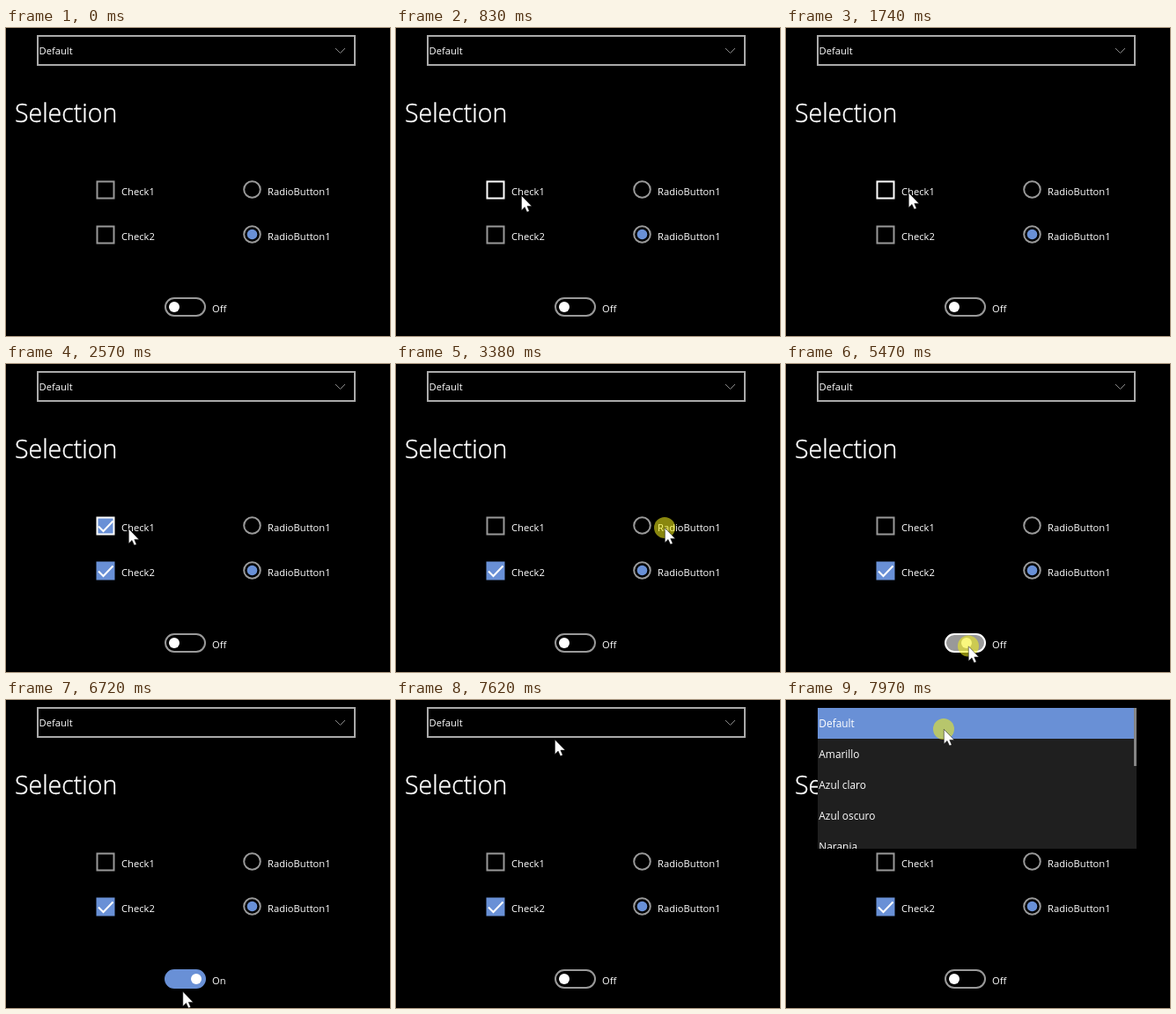
Recreate the animation shown at these times as an HTML page. Size 436x350 px, loop 8 s.

```html
<!DOCTYPE html>
<html lang="en">
<head>
<meta charset="utf-8">
<title>Selection controls</title>
<style>
html, body { margin: 0; width: 100%; height: 100%; overflow: hidden; background: #000; }
svg { display: block; width: 436px; height: 350px; }
text { font: 11.2px "Open Sans", "Noto Sans", sans-serif; fill: #fff; }
.title { font-size: 28.5px; font-weight: 300; stroke: #fff; stroke-width: .4; }
.popup text { font-size: 11.9px; }
.line { fill: none; stroke: #999; stroke-width: 2; }
.accent { fill: #6990d6; }
.tick { fill: none; stroke: #fff; stroke-width: 2; }
.checked > .fill { fill: #6990d6; stroke: #6990d6; }
.pressed > .fill { fill: #999; stroke: #999; }
.hover > .line { stroke: #fff; }
.combo > .line { stroke: #aaa; }
.combo.hover > .line { stroke: #ddd; }
.option:not(.checked) > .mark, .hidden { display: none; }
</style>
</head>
<body>
<svg viewBox="0 0 436 350" xmlns="http://www.w3.org/2000/svg">
  <clipPath id="list"><rect x="36" y="9" width="362" height="160"/></clipPath>
  <g id="combo" class="combo">
    <rect class="line" x="36" y="9" width="360" height="33"/>
    <text x="37.5" y="30">Default</text>
    <path d="M374 23l5.5 5.5 5.5-5.5" fill="none" stroke="#8a8a8a"/>
  </g>
  <text class="title" x="10" y="107">Selection</text>
  <g id="options"></g>
  <g id="toggle">
    <rect class="line fill" x="181" y="307" width="45" height="20" rx="10"/>
    <circle id="knob" cy="317" r="6" fill="#fff"/>
    <text id="state" x="234" y="323">Off</text>
  </g>
  <g id="popup" class="popup" clip-path="url(#list)">
    <rect x="36" y="9" width="362" height="160" fill="#1f1f1f"/>
    <rect class="accent" x="36" y="9" width="359" height="35"/>
    <rect x="395" y="9" width="3" height="66" fill="#858585"/>
    <g id="items"></g>
  </g>
  <g id="cursor">
    <circle id="press" r="12" fill="rgb(245,240,25)" fill-opacity=".56"/>
    <path d="M.3 .3V17L4 13.4 6.6 19 9.2 17.9 6.8 12.4H12Z" fill="#fff" stroke="#000" stroke-width=".5"/>
  </g>
</svg>
<script>
const $ = id => document.getElementById(id);
const LOOP = 8000, SETTLE = 130, OPEN = 7970;

// Build the repeated controls.
const option = (id, x, y, shapes, label) =>
  `<g id="${id}" class="option" transform="translate(${x} ${y})">${shapes}
   <text y="16" x="${label[0] === "C" ? 28.5 : 27.5}">${label}</text></g>`;
const box = `<rect class="line fill" x="1" y=".5" width="19" height="19"/>
  <path class="mark tick" d="M2.5 10.5l5.5 5.5 11-11.5"/>`;
const ring = `<circle class="line" cx="10" cy="9.5" r="9.3"/>
  <circle class="mark accent" cx="10" cy="9.5" r="5.8"/>`;
$("options").innerHTML = [1, 2].map(n => {
  const y = 123 + 51 * n;
  return option("check" + n, 102.5, y, box, "Check" + n) +
         option("radio" + n, 269.5, y, ring, "RadioButton1");
}).join("");
$("items").innerHTML = ["Default", "Amarillo", "Azul claro", "Azul oscuro", "Naranja"]
  .map((name, i) => `<text x="37.3" y="${31 + 35 * i}">${name}</text>`).join("");

const spots = {
  start: [278, 326], check1: [139, 187], check2: [139, 235], radio1: [305, 186],
  radio2: [316, 236], rest: [271, 277], knob: [193, 320.5], toggle: [206, 320.5],
  below: [200.5, 331], combo: [179, 33]
};

// Visits: time, spot, length of the press (if any)
const tour = [
  [130, "start"], [900, "check1"], [1310, "radio2"], [1810, "check1", 200],
  [2290, "check2", 110], [2700, "check1", 200], [3310, "radio1", 100],
  [3800, "radio2", 120], [4280, "rest"], [5260, "knob", 440],
  [6310, "toggle", 100], [6720, "below"], [6980, "toggle", 70], [7830, "combo", 170]
].map(([at, spot, hold = 0]) =>
  ({ at, spot, hold, arrive: hold ? at - SETTLE : at, leave: at + hold }));

const clamp = v => Math.max(0, Math.min(1, v));
const ease = v => v * v * (3 - 2 * v);
const flag = (id, name, on) => $(id).classList.toggle(name, on);
const releases = (spot, t) => tour.filter(v => v.spot === spot && v.hold && v.leave <= t);
const isOn = (spot, t) => releases(spot, t).length % 2 === 1;

// The knob is dragged out and back without switching.
const drag = tour.find(v => v.spot === "knob");
const dragX = t => 14 * Math.sin(Math.PI * clamp((t - drag.at) / drag.hold));

function pointer(t) {
  const i = Math.max(1, tour.findIndex(v => v.leave > t));
  const a = tour[i - 1], b = tour[i];
  const k = ease(clamp((t - a.leave) / (b.arrive - a.leave)));
  const [x, y] = spots[a.spot].map((p, n) => p + (spots[b.spot][n] - p) * k);
  return [x + dragX(t), y];
}

function knobX(t) {
  const slide = releases("toggle", t)
    .reduce((sum, v, i) => sum + (i % 2 ? -1 : 1) * ease(clamp((t - v.leave) / 150)), 0);
  return 191 + 25 * slide + dragX(t);
}

function draw(t) {
  const [x, y] = pointer(t);
  const over = (l, top, w, h) => t >= 130 && x >= l && x < l + w && y >= top && y < top + h;
  const held = tour.find(v => t >= v.at && t < v.leave);
  const on = isOn("toggle", t);

  $("cursor").setAttribute("transform", `translate(${x} ${y})`);
  flag("cursor", "hidden", t < 130);
  flag("press", "hidden", !held);

  for (const n of [1, 2]) {
    flag("check" + n, "hover", over(102, 122 + 51 * n, 68, 22));
    flag("check" + n, "checked", isOn("check" + n, t));
  }
  const first = isOn("radio1", t) && !isOn("radio2", t);
  flag("radio1", "checked", first);
  flag("radio2", "checked", !first);

  flag("toggle", "hover", !on && over(180, 306, 72, 22));
  flag("toggle", "checked", on);
  flag("toggle", "pressed", !!held && ["knob", "toggle"].includes(held.spot));
  $("knob").setAttribute("cx", knobX(t));
  $("state").textContent = on ? "On" : "Off";

  flag("combo", "hover", over(35, 8, 362, 35));
  flag("combo", "hidden", t >= OPEN);
  flag("popup", "hidden", t < OPEN);
}

function tick() {
  draw(performance.now() % LOOP);
  requestAnimationFrame(tick);
}
tick();
</script>
</body>
</html>
```
